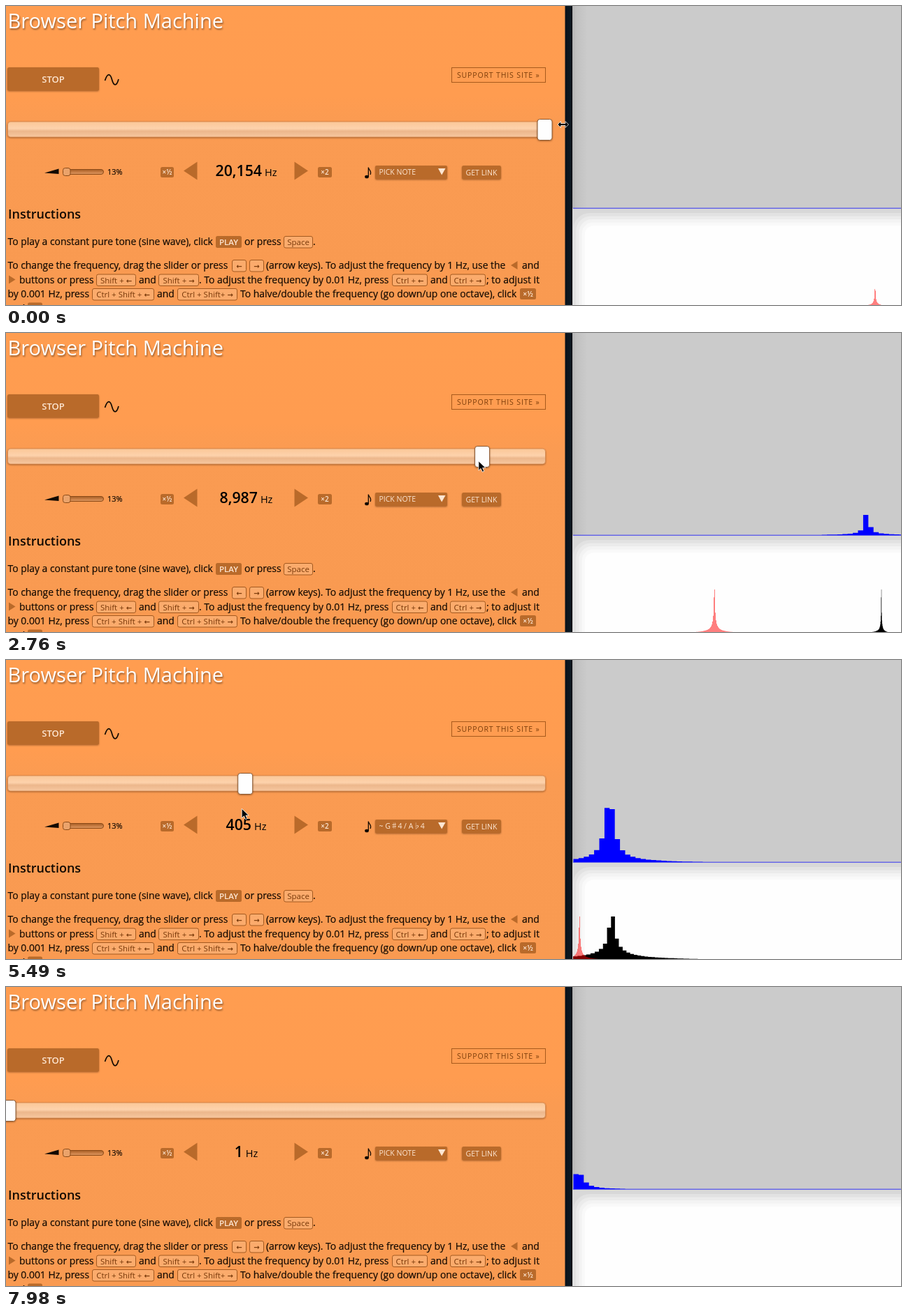
Write an HTML page that moves like this. It is 1280 px wide and 429 px high and loops after 8000 ms.

```html
<!DOCTYPE html>
<html lang="en">
<head>
<meta charset="utf-8">
<title>Tone sweep</title>
<style>
  html, body { margin: 0; width: 100%; height: 100%; overflow: hidden; background: #fa9b50; }
  svg { display: block; width: 100vw; height: 100vh; font-family: "Open Sans", "Noto Sans CJK JP", sans-serif; }
  .raised { filter: drop-shadow(0 1.5px 1px #5a2c0a80); }
  .title { filter: drop-shadow(1px 2px 1px #0006); }
  .body { stroke: #130a02; stroke-width: .2; }
  .symbol { font: bold 10px "DejaVu Sans", sans-serif; }
</style>
</head>
<body>
<svg id="stage" viewBox="0 0 1280 429" xmlns="http://www.w3.org/2000/svg"></svg>
<script>
const BROWN = '#b96a2a', INK = '#130a02', PALE = '#fde6d2';

// ---- static drawing helpers ----
const text = (x, y, size, str, attrs = '') =>
  `<text x="${x}" y="${y}" font-size="${size}" fill="${INK}" ${attrs}>${str}</text>`;
const rect = (x, y, w, h, fill, attrs = '') =>
  `<rect x="${x}" y="${y}" width="${w}" height="${h}" fill="${fill}" ${attrs}/>`;
const poly = (points, fill) => `<polygon points="${points}" fill="${fill}"/>`;
const label = (x, y, size, str, fill, weight = 400) =>
  text(x, y, size, str, `text-anchor="middle" font-weight="${weight}" style="fill:${fill}"`);
const button = (x, y, w, h, str, size, weight = 500) =>
  rect(x, y, w, h, BROWN, 'rx="2.5" class="raised"') +
  label(x + w / 2, y + h / 2 + size * .37, size, str, PALE, weight);
const badge = (x, y, w, h, str, size = 10.5) =>
  rect(x, y, w, h, BROWN, 'rx="2.5"') + label(x + w / 2, y + h / 2 + size * .37, size, str, PALE, 600);
const body = (x, y, str) => text(x, y, 13.9, str, 'class="body"');
const key = (x, right, y, str) =>
  rect(x + .5, y - 12.5, right - x - 1, 16.5, '#fbab6c', 'rx="2.5" stroke="#a35a20"') +
  label((x + right) / 2, y, 11.5, str.replace(/[←→]/, '<tspan class="symbol">$&</tspan>'), '#78390a', 500);
const gradient = (id, stops, down = 1) =>
  `<linearGradient id="${id}" x2="${1 - down}" y2="${down}">` + stops.map(([at, color]) =>
    `<stop offset="${at}" stop-color="${color}"/>`).join('') + '</linearGradient>';

const page = () => `
  ${rect(0, 0, 800, 429, 'url(#page)')}
  ${text(2.5, 32, 29, 'Browser Pitch Machine', 'class="title" style="fill:#fff"')}
  ${button(2, 88, 131, 33.5, 'STOP', 13, 600)}
  <path d="M141.5 107C145 96 149 96 151.5 105.5S158 116 161 105" fill="none" stroke="${INK}" stroke-width="1.7"/>
  ${rect(637.5, 88.5, 134, 21, 'none', 'stroke="#a75a1d"')}
  ${text(645, 102.7, 10.5, 'SUPPORT THIS SITE »', 'letter-spacing=".85" style="fill:#7c3e0b"')}
  ${rect(2.5, 166, 769, 22, 'url(#track)', 'rx="4" stroke="#d58a51" stroke-width=".8" class="raised"')}
  ${poly('55,239.5 75.5,233.5 75.5,241', INK)}
  ${rect(82.5, 234.5, 57, 7, 'url(#volume)', 'rx="3.5" stroke="#8a4a17"')}
  ${rect(81.5, 232.5, 10.5, 11, '#eba36b', 'rx="3" stroke="#8a4a17"')}
  ${text(145, 242, 11, '13%', 'class="body"')}
  ${badge(221, 231, 19, 15, '×½', 10)}${badge(446, 231, 20, 15, '×2', 10)}
  ${poly('254,236.5 273.5,223.5 273.5,249.5', BROWN)}
  ${poly('432,236.5 412.5,223.5 412.5,249.5', BROWN)}
  <ellipse cx="516" cy="245" rx="2.9" ry="2.3" fill="${INK}"/>
  <path d="M518.3 245V231.5C519 236 523.5 236 521 242" fill="none" stroke="${INK}" stroke-width="1.3"/>
  ${rect(528, 229, 103, 19.5, BROWN, 'rx="2" class="raised"')}
  ${poly('618,233 628.5,233 623.2,242.5', PALE)}
  ${button(652, 229, 56, 19.5, 'GET LINK', 10.5)}
  ${text(3, 305, 18, 'Instructions', 'font-weight="600"')}

  ${body(2.5, 343, 'To play a constant pure tone (sine wave), click')}
  ${badge(300, 330, 37, 17, 'PLAY', 11.5)}${body(341, 343, 'or press')}
  ${key(397, 439, 343, 'Space')}${body(439, 343, '.')}

  ${body(2.5, 377, 'To change the frequency, drag the slider or press')}
  ${key(323, 344, 377, '←')}${key(348, 369, 377, '→')}
  ${body(372, 377, '(arrow keys). To adjust the frequency by 1 Hz, use the')}
  ${poly('722,372 731.5,366 731.5,378', BROWN)}${body(738, 377, 'and')}

  ${poly('13.5,392.5 4,386.5 4,398.5', BROWN)}${body(19, 397.5, 'buttons or press')}
  ${key(129, 186, 397.5, 'Shift + ←')}${body(190, 397.5, 'and')}
  ${key(218, 276, 397.5, 'Shift + →')}
  ${body(276, 397.5, '. To adjust the frequency by 0.01 Hz, press')}
  ${key(552, 603, 397.5, 'Ctrl + ←')}${body(607, 397.5, 'and')}
  ${key(635, 686, 397.5, 'Ctrl + →')}${body(687, 397.5, '; to adjust it')}

  ${body(2.5, 418, 'by 0.001 Hz, press')}
  ${key(123, 212, 418, 'Ctrl + Shift + ←')}${body(216, 418, 'and')}
  ${key(245, 331, 418, 'Ctrl + Shift+ →')}
  ${body(335, 418, 'To halve/double the frequency (go down/up one octave), click')}
  ${badge(735, 405, 23, 16, '×½')}
  ${body(2.5, 438.5, 'and')}${badge(31, 425.5, 21, 16, '×½')}`;

// white card whose soft edge is built from nested rounded layers
const card = () => ['#e2e2e2', '#ebebeb', '#f3f3f3', '#f9f9f9', '#fefefe'].map((fill, i) =>
  rect(811 + 4.2 * i, 297 + 4.5 * i, 520, 180, fill, `rx="${24 - 2.7 * i}"`)).join('');

const panel = () => `
  ${rect(810, 0, 470, 291, 'url(#wall)')}
  ${rect(810, 290.5, 470, 139, '#d8d8d8')}
  ${card()}
  ${rect(799.5, 0, 10.5, 429, 'url(#gap)')}`;

document.getElementById('stage').innerHTML = `
  <defs>
    ${gradient('page', [[0, '#ff9d50'], [.3, '#ff9c50'], [.4, '#fa9b52'], [1, '#f99a51']])}
    ${gradient('track', [[0, '#fbc797'], [.45, '#fdd2ac'], [.62, '#ecb78c'], [1, '#f7c79f']])}
    ${gradient('volume', [[0, '#a85d24'], [1, '#e39a61']])}
    ${gradient('gap', [[0, '#07111a'], [.8, '#0d1922'], [1, '#05080b']], 0)}
    ${gradient('wall', [[0, '#b2b2b2'], [.01, '#c0c0c0'], [.045, '#cbcbcb']], 0)}
    <clipPath id="noteClip">${rect(528, 229, 85, 20, '#000')}</clipPath>
  </defs>
  ${page()}${panel()}
  <path id="bars" fill="#00f"/>
  <path id="warped" fill="#000"/>
  <path id="linear" fill="#f00" fill-opacity=".5"/>
  <g clip-path="url(#noteClip)"><text id="note" x="533.5" y="242" font-size="10.5" font-weight="500" fill="${PALE}"/></g>
  <text x="343.5" y="244" text-anchor="middle" fill="#000"><tspan id="hertz" font-size="21.3" font-weight="600"/><tspan font-size="14.5" dx="4">Hz</tspan></text>
  <rect id="handle" y="162.5" width="21" height="30" rx="3.5" fill="#fefefe" stroke="#8c5a33" class="raised"/>
  <path id="arrow" d="M0 0V13.5L3.2 10.6 5.4 15.5 7.8 14.5 5.7 9.7H10Z" stroke="#fff" stroke-width=".8"/>
  <path id="resize" d="M789 170l4.500-4.500v3h6.500v-3l4.500 4.500-4.500 4.500v-3h-6.500v3z" stroke="#fff" stroke-width=".8"/>`;

const el = Object.fromEntries(['bars', 'warped', 'linear', 'note', 'hertz', 'handle', 'arrow', 'resize']
  .map(id => [id, document.getElementById(id)]));

// ---- motion ----
const LOOP = 8000, STEP = 121;
const LEFT = 811, WIDTH = 469, BIN_HZ = 46.66, BAR = 7.4;

// slider position <-> frequency
const toX = hz => 3 + 110.9 * Math.log((hz + 19) / 20);
const toHz = x => 20 * Math.exp((x - 3) / 110.9) - 19;

// the drag in [ms, Hz]; it ends beyond the slider's left stop
const drag = [[0, 20154], [120, 20154], [1410, 13887], [2760, 8987], [3590, 6346], [4300, 5530],
  [4650, 1038], [4880, 520], [6440, 270], [6550, 266], [7680, -6], [7980, -6]];

const segmentAt = t => Math.max(1, drag.findIndex(([end]) => t < end));
function dragX(t) {
  const clamped = Math.min(Math.max(t, 0), 7979), i = segmentAt(clamped);
  const [a, from] = drag[i - 1], [b, to] = drag[i];
  return toX(from) + (toX(to) - toX(from)) * (clamped - a) / (b - a);
}

// the screen refreshes in even steps within each part of the drag
function refreshTime(t) {
  const last = drag.at(-1)[0];
  if (t >= last) return last;
  const i = segmentAt(t), a = drag[i - 1][0], b = drag[i][0];
  const step = (b - a) / Math.max(1, Math.round((b - a) / STEP));
  return a + Math.floor((t - a) / step + 1e-6) * step;
}

// the spectra trail behind the slider
const heardHz = t => Math.max(1, toHz(dragX(t - 150)));
const fadeOut = t => Math.min(1, (LOOP - t) / 150);

const barAxis = hz => (7 + 463 * (1 - Math.exp(-hz / 4250))) / BAR;
const peakAxis = hz => 471 * (1 - Math.exp(-hz / 3430));

const NOTES = ['C', 'C♯/D♭', 'D', 'D♯/E♭', 'E', 'F', 'F♯/G♭', 'G', 'G♯/A♭', 'A', 'A♯/B♭', 'B'];
function noteName(hz) {
  const n = Math.round(12 * Math.log2(hz / 440)) + 57;
  if (n < 0 || n > 107) return 'PICK NOTE';
  const octave = Math.floor(n / 12);
  const name = NOTES[n % 12].split('/').map(s => s + octave).join(' / ');
  return '~ ' + name + ({ C4: ' MIDDLE C', C6: ' SOPRANO C' }[name] || '');
}

const column = (x, w, h, base) => `M${x.toFixed(2)} ${base}v${(-h).toFixed(2)}h${w.toFixed(2)}V${base}z`;

function drawBars(t) {
  const hz = heardHz(t), now = barAxis(hz), before = barAxis(heardHz(t - 60));
  const smear = 1 + .3 * (before - now);
  const height = fadeOut(t) * (Math.max(0, 100 * (1 - hz / 15000)) + 88 * Math.exp(-hz / 60)) / smear;
  const spread = .5 + .6 * Math.exp(-hz / 2000);
  const bump = d => 1 / (1 + (d / spread) ** 2) + .08 * Math.min(1, d) * Math.exp(-d / 7);
  let path = column(LEFT, WIDTH, .8, 290.5);
  for (let i = 0; i < 64; i++) {
    const h = height * Math.max(bump(Math.abs(i + .5 - now)), .45 * bump(Math.abs(i + .5 - before)));
    path += column(LEFT + .5 + i * BAR, BAR, h, 290.5);
  }
  el.bars.setAttribute('d', path);
}

function drawPeaks(t) {
  const hz = heardHz(t), center = hz / BIN_HZ;
  const height = Math.min(63, (23600 - hz) / 139) * fadeOut(t) ** 2;
  let linear = '', warped = '';
  for (let i = 0; i < WIDTH; i++) {
    const d = Math.max(0, Math.abs(i + .5 - center) - .5);
    const h = height / (1 + (d / .75) ** .95);
    if (h < 2) continue;
    const x = peakAxis(i * BIN_HZ);
    linear += column(LEFT + i, 1, h, 431);
    warped += column(LEFT + x, peakAxis((i + 1) * BIN_HZ) - x, h, 431);
  }
  el.linear.setAttribute('d', linear);
  el.warped.setAttribute('d', warped);
}

function draw(t) {
  const x = Math.max(3, dragX(t)), hz = Math.max(1, toHz(x));
  el.handle.setAttribute('x', x - 10);
  el.hertz.textContent = Math.round(hz).toLocaleString('en-US');
  el.note.textContent = noteName(hz);

  // the pointer leads the handle and drifts down as it goes left
  const pointerX = dragX(t + 80) - 1 + 26 * Math.max(0, 1 - t / 300);
  el.arrow.setAttribute('transform', `translate(${pointerX} ${176 + .087 * (770 - x)})`);
  el.arrow.style.display = t < 120 ? 'none' : '';
  el.resize.style.display = t < 120 ? '' : 'none';

  drawBars(t);
  drawPeaks(t);
}

let shown = -1;
function tick() {
  const t = refreshTime(performance.now() % LOOP);
  if (t !== shown) draw(shown = t);
  requestAnimationFrame(tick);
}
tick();
</script>
</body>
</html>
```
